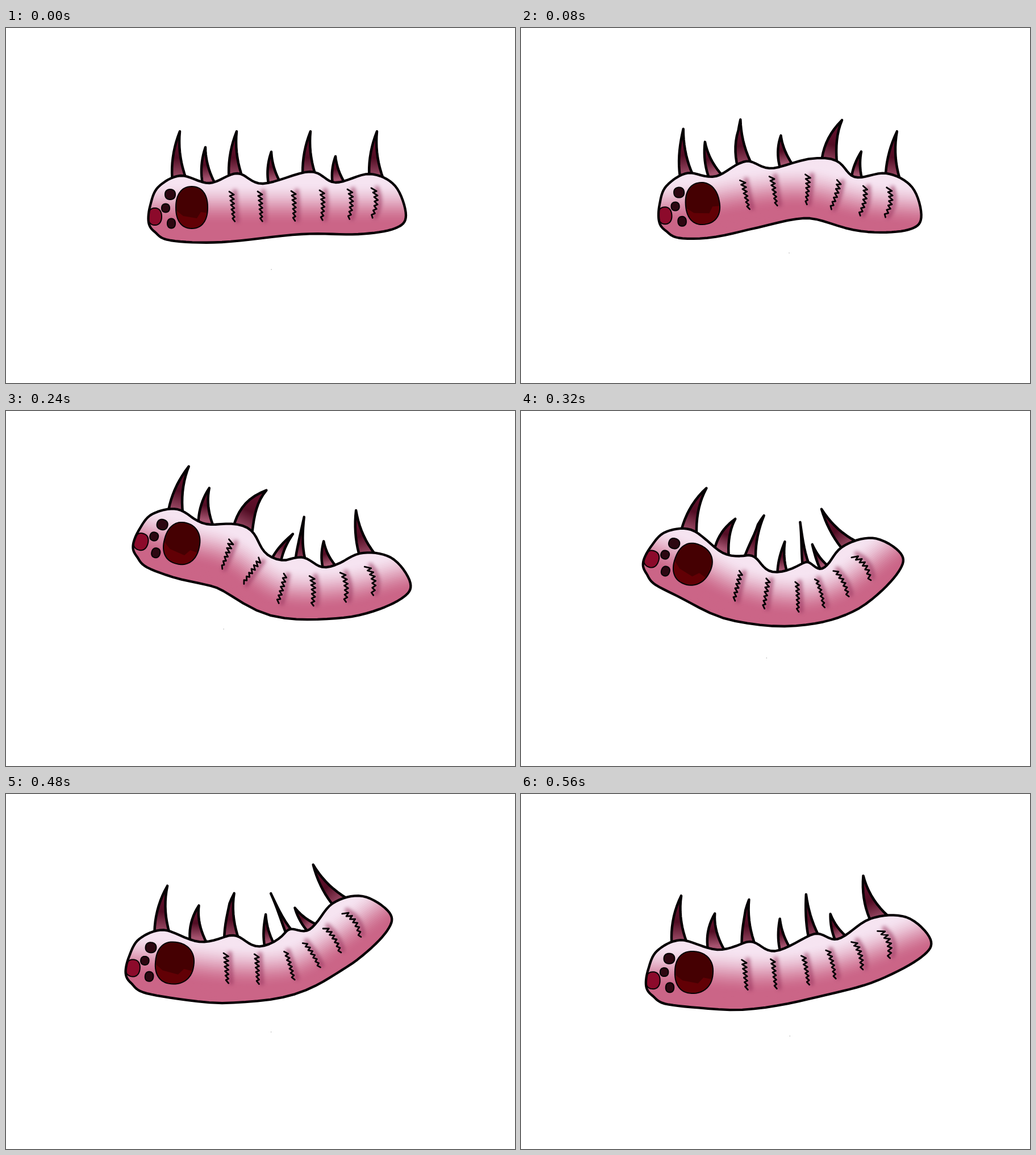
An HTML page with a canvas that plays this animation: 896 by 625 pixels, repeating every 0.64 s.

```html
<!DOCTYPE html>
<html lang="en">
<head>
<meta charset="utf-8">
<title>Crawling grub</title>
<style>
html, body { margin: 0; width: 100%; height: 100%; overflow: hidden; background: #fff; }
canvas { display: block; }
</style>
</head>
<body>
<canvas id="stage" width="896" height="625"></canvas>
<script>
const ctx = document.getElementById('stage').getContext('2d');
const STEP = 80;
const INK = '#050003';

// The grub is drawn once, lying straight; each pose only bends its spine.
const SPINE_Y = 314;
const SPINE_X = [252, 327, 400, 506, 604, 704]; // nose, mouth, three creases, tail

const flat = SPINE_X.map(x => [x, SPINE_Y]);
const arched = [[232, 312], [310, 300], [393, 272], [500, 256], [596, 302], [708, 322]];
const rearing = [[232, 210], [309, 231], [390, 253], [484, 313], [595, 314], [708, 287]];
const cupped = [[226, 240], [301, 268], [382, 308], [486, 328], [566, 307], [659, 238]];
const tailUp = [[207, 265], [287, 279], [383, 295], [497, 295], [560, 233], [616, 151]];
const settling = [[222, 310], [302, 312], [396, 318], [501, 311], [594, 288], [715, 241]];

const lerp = (a, b, t) => a.map((v, i) => v + (b[i] - v) * t);
const between = (a, b) => a.map((p, i) => lerp(p, b[i], 0.5));
const poses = [flat, between(flat, arched), arched, rearing, cupped, tailUp, between(tailUp, settling), settling];

const OUTLINE = [
  [251, 342], [254, 312], [268, 280],
  [307, 260], [358, 273], [407, 256], [452, 274], [535, 253], [580, 272], [640, 257],
  [685, 278], [704, 330], [684, 353],
  [620, 363], [520, 363], [380, 377], [290, 374], [262, 359]];
const SPIKE_X = [307, 357, 407, 473, 537, 586, 654];
const CREASE_X = [397, 447, 506, 556, 605, 647];

const steps = n => Array.from({ length: n + 1 }, (_, i) => i / n);

// Cubic Hermite value and slope on [0, h]
function hermite(p, q, m, n, h, t) {
  const c = 3 * (q - p) - h * (2 * m + n), d = 2 * (p - q) + h * (m + n);
  return [p + t * (h * m + t * (c + t * d)), (h * m + t * (2 * c + 3 * t * d)) / h];
}

let spine = flat;

// Moves a point of the straight grub to its place beside the bent spine
function bend([x, y]) {
  const last = SPINE_X.length - 1;
  let i = 0;
  while (i < last - 1 && x > SPINE_X[i + 1]) i++;
  const h = SPINE_X[i + 1] - SPINE_X[i];
  const slope = (k, axis) => {
    const a = Math.max(k - 1, 0), b = Math.min(k + 1, last);
    return (spine[b][axis] - spine[a][axis]) / (SPINE_X[b] - SPINE_X[a]);
  };
  const [[px, dx], [py, dy]] = [0, 1].map(axis => hermite(
    spine[i][axis], spine[i + 1][axis], slope(i, axis), slope(i + 1, axis), h, (x - SPINE_X[i]) / h));
  const offset = (y - SPINE_Y) / Math.hypot(dx, dy);
  return [px - dy * offset, py + dx * offset];
}

function shape(points) {
  const path = new Path2D();
  points.forEach(p => path.lineTo(...bend(p)));
  return path;
}

function closed(points) {
  const path = shape(points);
  path.closePath();
  return path;
}

function smoothLoop(points) {
  const at = i => points[(i + points.length) % points.length];
  return points.flatMap((p, i) => steps(8).slice(0, -1).map(t => [0, 1].map(axis => {
    const [a, b, c, d] = [-1, 0, 1, 2].map(k => at(i + k)[axis]);
    return hermite(b, c, (c - a) / 2, (d - b) / 2, 1, t)[0];
  })));
}
const BODY = smoothLoop(OUTLINE);

function stroke(path, width, color = INK) {
  ctx.strokeStyle = color;
  ctx.lineWidth = width;
  ctx.stroke(path);
}

function paint(path, fill, width) {
  ctx.fillStyle = fill;
  ctx.fill(path);
  stroke(path, width);
}

// Rounded blob between an ellipse and a box
function blob(cx, cy, rx, ry) {
  const soften = v => Math.sign(v) * Math.abs(v) ** 0.88;
  return closed(steps(60).map(t => {
    const a = t * 2 * Math.PI;
    return [cx + rx * soften(Math.cos(a)), cy + ry * soften(Math.sin(a))];
  }));
}

// Tall and small spikes alternate
function spike(x, i) {
  const small = i % 2;
  const width = small ? 11 : 13.5, foot = 274;
  const tip = small ? [x - 6, 206 + 4 * i] : [x - 1, 182];
  const side = start => steps(10).map(t => {
    const control = lerp(start, tip, 0.5);
    control[0] -= (foot - tip[1]) * 0.13;
    return lerp(lerp(start, control, t), lerp(control, tip, t), t);
  });
  const shade = ctx.createLinearGradient(...bend(tip), ...bend([x, 266]));
  shade.addColorStop(0, '#6b1230');
  shade.addColorStop(0.55, '#520d24');
  shade.addColorStop(1, '#a5536f');
  paint(shape([...side([x - width, foot]), ...side([x + width, foot]).reverse()]), shade, 4.5);
}

// Pale back fading into a pink belly, painted in rows along the body
function shadeBody() {
  for (let y = 245; y < 385; y += 3) {
    const t = Math.min(Math.max((y - 273) / 75, 0), 1);
    const color = lerp([246, 228, 241], [203, 101, 135], t * t * (3 - 2 * t));
    stroke(shape(steps(60).map(s => [240 + 475 * s, y])), 6, `rgb(${color})`);
  }
}

function crease(x, i) {
  const curl = i * i / 4; // creases near the tail sit higher and curve more
  const line = (count, shift) => shape(steps(count).map((t, k) =>
    [x + (4 - 1.5 * i) * t + curl * 4 * t * (1 - t) + shift(k), 288 - curl + 51 * t + (k % 2) * 1.5]));
  ctx.filter = 'blur(3px)';
  stroke(line(8, () => 6), 8, 'rgba(150,50,92,.6)');
  ctx.filter = 'none';
  stroke(line(13, k => (k % 2 ? 4 : -4) * (1 - k / 24)), 2.8);
}

function mouth() {
  const path = blob(327, 316, 28, 37);
  ctx.fillStyle = '#450002';
  ctx.fill(path);
  ctx.save();
  ctx.clip(path);
  ctx.fillStyle = '#620005';
  ctx.fill(closed([[298, 320], [312, 331], [336, 335], [343, 324], [356, 326], [356, 356], [298, 356]]));
  ctx.restore();
  stroke(path, 2);
}

function draw() {
  ctx.fillStyle = '#fff';
  ctx.fillRect(0, 0, 896, 625);
  ctx.lineJoin = ctx.lineCap = 'round';
  const [speckX, speckY] = bend([467, 425]);
  ctx.fillStyle = '#aaa';
  ctx.fillRect(speckX - 0.5, speckY - 0.5, 1.3, 1.3);

  SPIKE_X.forEach(spike);

  const body = closed(BODY);
  ctx.save();
  ctx.clip(body);
  shadeBody();
  paint(blob(262, 332, 12, 15), '#8c0a2b', 2);
  ctx.restore();

  mouth();
  for (const eye of [[289, 293, 9, 9], [281, 317, 7, 7.5], [291, 344, 7, 8.5]])
    paint(blob(...eye), '#2d0711', 2);
  CREASE_X.forEach(crease);
  stroke(body, 4.3);
}

let shown = -1;
function tick() {
  const index = Math.floor(performance.now() / STEP) % poses.length;
  if (index !== shown) {
    shown = index;
    spine = poses[index];
    draw();
  }
  requestAnimationFrame(tick);
}
tick();
</script>
</body>
</html>
```
